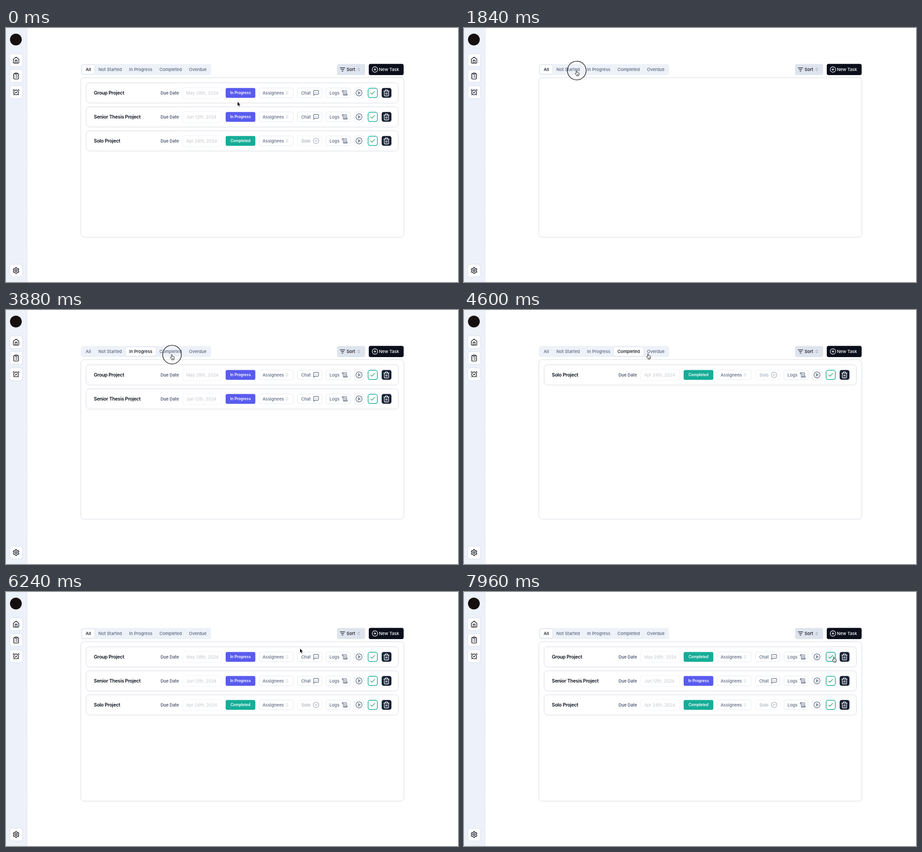
An HTML page that plays this animation: 998 px wide and 561 px high, repeating every 8 s.

```html
<!DOCTYPE html>
<html lang="en">
<head>
<meta charset="utf-8">
<title>Task board</title>
<style>
html, body { margin: 0; width: 100%; height: 100%; overflow: hidden; background: #fff; }
svg { display: block; width: 100%; height: 100%; font-family: Inter, "Liberation Sans", sans-serif; }
.card { filter: drop-shadow(0 .8px .9px rgba(15, 23, 42, .16)); }
.icon { fill: none; stroke-width: 2; stroke-linecap: round; stroke-linejoin: round; }
</style>
</head>
<body>
<svg id="stage" viewBox="0 0 998 561"></svg>
<script>
const INK = '#0b0f1c', SLATE = '#5b677f', LINE = '#e4e8ee', TEAL = '#16ad98', INDIGO = '#595bef';

const ring = r => `M${12 - r} 12a${r} ${r} 0 1 0 ${2 * r} 0a${r} ${r} 0 1 0 ${-2 * r} 0`;
const ICONS = {
  home: 'm3 9 9-7 9 7v11a2 2 0 0 1-2 2H5a2 2 0 0 1-2-2zM9 22V12h6v10',
  tasks: 'M9 2h6a1 1 0 0 1 1 1v2a1 1 0 0 1-1 1H9a1 1 0 0 1-1-1V3a1 1 0 0 1 1-1zM16 4h2a2 2 0 0 1 2 2v14a2 2 0 0 1-2 2H6a2 2 0 0 1-2-2V6a2 2 0 0 1 2-2h2M12 11h4M12 16h4M8 11h.01M8 16h.01',
  alarm: 'M4 13a8 8 0 1 0 16 0a8 8 0 1 0-16 0M5 3 2 6m20 0-3-3M6.4 18.7 4 21m13.6-2.3L20 21M9 13l2 2 4-4',
  chat: 'M21 15a2 2 0 0 1-2 2H7l-4 4V5a2 2 0 0 1 2-2h14a2 2 0 0 1 2 2zM8 10h.01M12 10h.01M16 10h.01',
  logs: 'M15 12h-5M15 8h-5M19 17V5a2 2 0 0 0-2-2H4M8 21h12a2 2 0 0 0 2-2v-1a1 1 0 0 0-1-1H11a1 1 0 0 0-1 1v1a2 2 0 1 1-4 0V5a2 2 0 1 0-4 0v2a1 1 0 0 0 1 1h3',
  play: ring(10) + 'M10 8l6 4-6 4z',
  check: 'M20 6 9 17l-5-5',
  done: ring(10) + 'm7 0 2 2 4-4',
  trash: 'M3 6h18M19 6v14c0 1-1 2-2 2H7c-1 0-2-1-2-2V6M8 6V4c0-1 1-2 2-2h4c1 0 2 1 2 2v2M10 11v6M14 11v6',
  plus: ring(10) + 'M8 12h8M12 8v8',
  filter: 'M3 6h18M7 12h10M10 18h4',
  updown: 'm7 15 5 5 5-5M7 9l5-5 5 5'
};
ICONS.done = ring(10) + 'M9 12l2 2 4-4';

const TOOTH = 'M9.78 4.18V4a2 2 0 0 1 2-2h.44a2 2 0 0 1 2 2v.18a2 2 0 0 0 1 1.73l.43.25a2 2 0 0 0 2 0l.15-.08';
const gear = [0, 1, 2, 3, 4, 5].map(i => `<path d="${TOOTH}" transform="rotate(${i * 60} 12 12)"/>`).join('') +
  `<path d="${ring(3)}"/>`;

const rect = (x, y, w, h, r, fill, extra = '') =>
  `<rect x="${x}" y="${y}" width="${w}" height="${h}" rx="${r}" fill="${fill}" ${extra}/>`;
const outline = `stroke="${LINE}"`;

function text(str, x, cy, { size = 9.5, weight = 500, fill = SLATE, anchor = 'middle', extra = '' } = {}) {
  return `<text x="${x}" y="${cy + size * .364}" font-size="${size}" font-weight="${weight}" fill="${fill}" text-anchor="${anchor}" ${extra}>${str}</text>`;
}
function icon(name, cx, cy, size, color) {
  const body = name === 'gear' ? gear : `<path d="${ICONS[name]}"/>`;
  return `<g class="icon" stroke="${color}" transform="translate(${cx - size / 2} ${cy - size / 2}) scale(${size / 24})">${body}</g>`;
}
// Outlined control centred on y = 0 of its row
const box = (x, w, extra = '') => rect(x, -10.8, w, 21.6, 4, '#fff', `${outline} ${extra}`);

const tabs = [
  { name: 'All', x: 168, w: 27.5, mid: 181.8 },
  { name: 'Not Started', x: 195.5, w: 68.5, mid: 230 },
  { name: 'In Progress', x: 264, w: 67, mid: 297.5 },
  { name: 'Completed', x: 331, w: 65, mid: 363.5 },
  { name: 'Overdue', x: 396, w: 55, mid: 423.5 }
];
const tasks = [
  { name: 'Group Project', due: 'May 28th, 2024', status: 'In Progress' },
  { name: 'Senior Thesis Project', due: 'Jun 12th, 2024', status: 'In Progress' },
  { name: 'Solo Project', due: 'Apr 24th, 2024', status: 'Completed', solo: true }
];

const row = (task, i) => `<g id="row${i}">
  <g class="card">${rect(177.5, -22, 688.5, 44, 7, '#fff', outline)}</g>
  ${text(task.name, 194, 0, { size: 10.6, weight: 600, fill: INK, anchor: 'start', extra: 'letter-spacing="-.025em"' })}
  ${text('Due Date', 361.6, 0, { size: 9.2, weight: 600, fill: '#4d5970' })}
  ${rect(390.5, -12.3, 86, 24.6, 4, '#fff', 'stroke="#f0f2f5"')}
  ${text(task.due, 398, 0, { weight: 400, fill: '#c1c5cc', anchor: 'start' })}
  <rect id="badge${i}" x="485" y="-10.9" width="65.5" height="21.8" rx="3.5"/>
  ${text('', 517.7, 0, { size: 8.35, weight: 600, fill: '#fff', extra: `id="status${i}"` })}
  ${box(559, 75.5)}${text('Assignees', 590, 0)}${icon('updown', 620.5, 0, 9, '#8a94a5')}
  <g opacity="${task.solo ? .55 : 1}">
    ${box(643.5, 54)}${text(task.solo ? 'Solo' : 'Chat', 662.3, 0)}${icon(task.solo ? 'done' : 'chat', 684.7, 0, 14.5, SLATE)}
  </g>
  ${box(706.5, 53.5)}${text('Logs', 725.3, 0)}${icon('logs', 748, 0, 13.6, SLATE)}
  ${box(769, 21)}${icon('play', 779.4, 0, 16, SLATE)}
  ${rect(799.5, -10.2, 20.4, 20.4, 4.5, '#fff', `stroke="${TEAL}" stroke-width="1.5" id="tick${i}"`)}
  ${icon('check', 809.7, 0, 13.5, '#178a4c')}
  ${rect(829.5, -10.8, 21.5, 21.6, 4.5, '#172033')}${icon('trash', 840, 0, 16, '#fff')}
</g>`;

const navButton = (name, y) =>
  `<g class="card">${rect(9, y - 13.5, 27, 27, 5, '#fff')}</g>${icon(name, 22.3, y, 16, INK)}`;

const stage = document.getElementById('stage');
stage.innerHTML = `
  <linearGradient id="edge"><stop stop-color="#dfe4ec"/><stop offset="1" stop-color="#fff"/></linearGradient>
  ${rect(0, 0, 45.5, 561, 0, '#edf1f9')}${rect(45.5, 0, 3, 561, 0, 'url(#edge)')}
  <circle cx="21.8" cy="25.5" r="13" fill="#15100f"/>
  ${navButton('home', 71)}${navButton('tasks', 106)}${navButton('alarm', 141.7)}${navButton('gear', 535.7)}
  ${rect(165.5, 79.5, 287.5, 24.5, 5, '#edf1f8')}
  <g class="card"><rect id="active" y="82" height="19.3" rx="3.5" fill="#fff"/></g>
  ${tabs.map((tab, i) => text(tab.name, tab.mid, 91.6, { extra: `id="tab${i}"` })).join('')}
  ${rect(731, 79.5, 62, 24.5, 4, '#dee4ed')}
  ${icon('filter', 743, 91.6, 14, INK)}${text('Sort', 761.5, 91.6, { fill: INK })}${icon('updown', 778.8, 91.6, 9, SLATE)}
  ${rect(801, 79.3, 77, 24.7, 4, INK)}
  ${icon('plus', 814.6, 91.6, 14.5, '#fff')}${text('New Task', 845.6, 91.6, { fill: '#fff' })}
  <g class="card">${rect(165.5, 110, 712.5, 351.5, 7, '#fff', outline)}</g>
  ${tasks.map(row).join('')}
  <circle id="ripple" r="20.7" fill="none" stroke="#111" stroke-width="1.3"/>
  <path id="arrow" d="M0 0v10l2.3-2.1 1.6 3.7 1.7-.7-1.6-3.6h3.1z" fill="#000" stroke="#fff" stroke-width=".7"/>
  <path id="hand" d="M-1.4 6.6V.8a1 1 0 0 1 2 0v3.4l3.7.8q1.3.4 1.2 1.8l-.5 2.4q-.3 1-.9 1.5v1h-4.5l-.4-1.1-2.7-3.2q-.6-1 .2-1.4.8-.3 1.9.6zM2 8.2v1.7M3.5 8.2v1.7M.5 8.2v1.7" fill="#fff" stroke="#111" stroke-width=".9" stroke-linejoin="round"/>`;

const el = id => document.getElementById(id);
const show = (node, on) => node.setAttribute('visibility', on ? 'visible' : 'hidden');

const LOOP = 8000, PRESS = 160, MARKED = 7800;
const START = [511, 162.5];
// Pointer moves: start, end, x, y
const moves = [
  [840, 1480, 249, 94],
  [2280, 2640, 299.5, 96],
  [3040, 3480, 366.5, 98.5],
  [4400, 4760, 423, 96],
  [5240, 5680, 198, 94],
  [5680, 5800, 186, 90],
  [6020, 6240, 649, 124.5],
  [6440, 7120, 817, 143.5]
];
// Clicks: time, tab opened
const clicks = [[1800, 1], [2840, 2], [3880, 3], [5000, 4], [5800, 0], [7560, 0]];

function pointer(t) {
  let [x, y] = START;
  for (const [a, b, toX, toY] of moves) {
    if (t < a) break;
    const p = Math.min(1, (t - a) / (b - a)) ** .75, e = p * p * (3 - 2 * p);
    x += (toX - x) * e;
    y += (toY - y) * e;
  }
  return [x, y];
}

const openTab = (t, delay) => clicks.reduce((tab, [at, next]) => t >= at + delay ? next : tab, 0);

function render(t) {
  const current = openTab(t, 80), filter = tabs[openTab(t, 40)].name;
  el('active').setAttribute('x', tabs[current].x);
  el('active').setAttribute('width', tabs[current].w);
  tabs.forEach((_, i) => el('tab' + i).setAttribute('fill', i === current ? INK : SLATE));

  const [x, y] = pointer(t);
  let slot = 0, overButton = false;
  tasks.forEach((task, i) => {
    const status = i === 0 && t >= MARKED ? 'Completed' : task.status;
    const visible = filter === 'All' || filter === status;
    show(el('row' + i), visible);
    if (!visible) return;
    const cy = 143.3 + 53 * slot++;
    el('row' + i).setAttribute('transform', `translate(0 ${cy})`);
    el('badge' + i).setAttribute('fill', status === 'Completed' ? TEAL : INDIGO);
    el('status' + i).textContent = status;
    const level = Math.abs(y - cy) < 11;
    const inside = (a, b) => level && x > a && x < b;
    el('tick' + i).setAttribute('fill', inside(799, 820) ? '#edf3f7' : '#fff');
    overButton ||= [[559, 635], [643, 698], [706, 760], [769, 790], [799, 820], [829, 851]].some(b => inside(...b));
  });

  const overTabs = x > 168 && x < 451 && y > 81 && y < 103;
  const at = `translate(${x} ${y})`, hand = overTabs || overButton;
  for (const id of ['arrow', 'hand', 'ripple']) el(id).setAttribute('transform', at);
  show(el('hand'), hand);
  show(el('arrow'), !hand);
  show(el('ripple'), clicks.some(([c]) => t >= c && t < c + PRESS));
}

const begin = performance.now();
function tick() {
  render((performance.now() - begin) % LOOP);
  requestAnimationFrame(tick);
}
tick();
</script>
</body>
</html>
```
